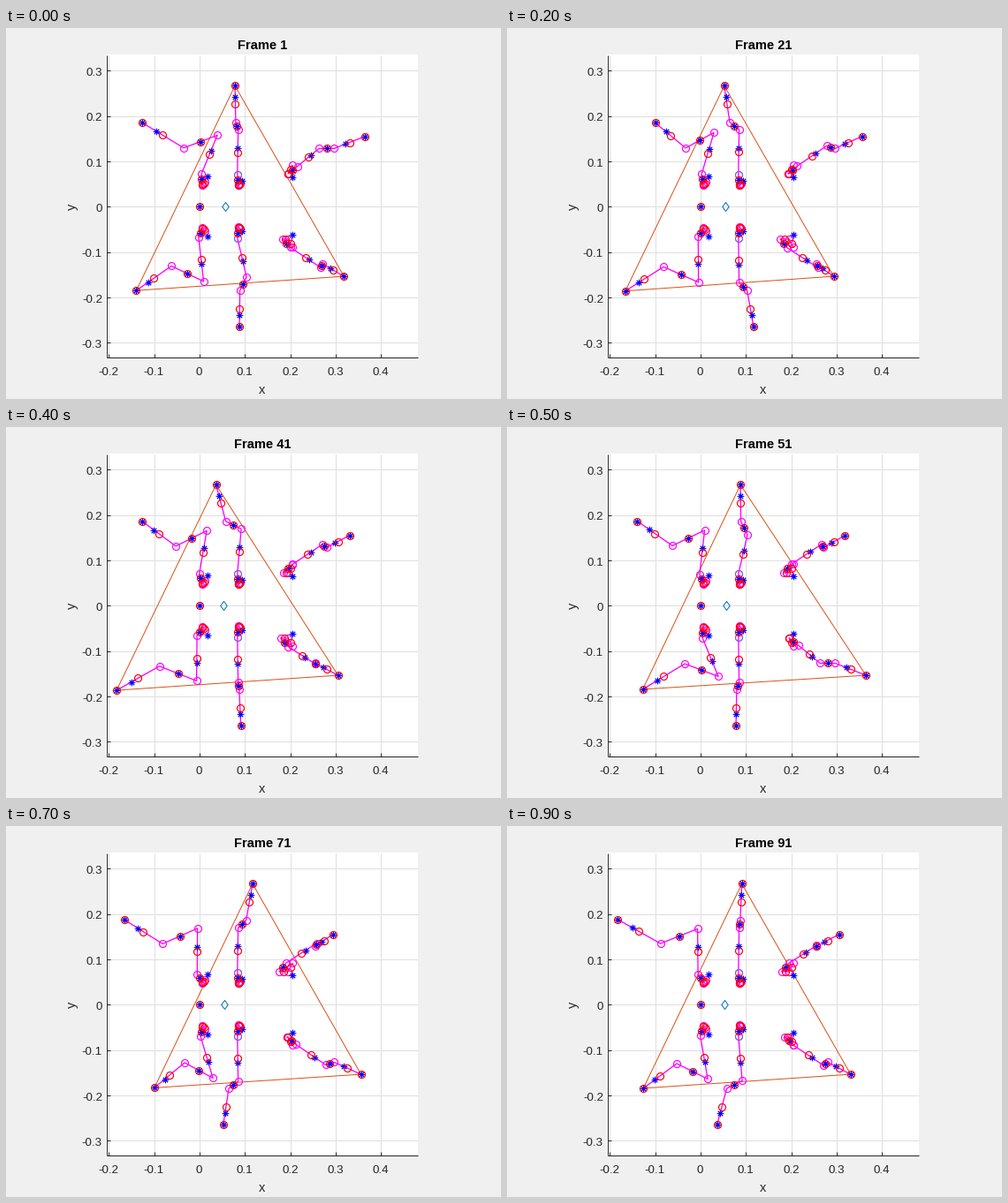
A matplotlib script for the animation above (1 s loop, 560x420 px).

```python
import numpy as np
import matplotlib.pyplot as plt
from matplotlib.animation import FuncAnimation
from matplotlib.patches import Rectangle

W, H, DPI = 560, 420, 100
PX = 72 / DPI                      # points per pixel
FRAMES, INTERVAL = 10, 100
X0, Y0, SCALE = 218.6, 201.9, 513.4
LEFT, RIGHT, TOP, BOTTOM = 113.5, 465.5, 30.5, 372.5
INK = "#262626"

plt.rcParams["font.family"] = "Liberation Sans"

# Key poses of the gait, in pixels from the body origin with y pointing outwards:
# phase, knee x, knee y, ankle x, foot x
REAR = [(0, 20.5, 80.5, -17.5, -65), (1, 19, 83, -11.5, -44),
        (8, -5.5, 86.5, -46.5, -91.5), (9, -3, 85.5, -45, -93.5)]
MIDDLE = [(3, 44, 87, 29.5, 20.5), (4, 47.5, 86.5, 30, 19),
          (5, 53.5, 80, 46, 45.5), (6, 44, 86.5, 57, 67)]
FRONT = [(0, 135.5, 65.5, 152.5, 187.5), (1, 148, 67.5, 164.5, 199),
         (2, 143, 68.5, 152.5, 183), (8, 131, 69.5, 127, 144.5),
         (9, 131.5, 66.5, 131, 157)]


def pose(keys, phase):
    """Linear motion between the key poses of one cycle."""
    times, *tracks = zip(*keys)
    return [np.interp(phase, times, track, period=FRAMES) for track in tracks]


# Each leg returns its joints from hip to foot.
def rear(phase):
    kx, ky, ax, fx = pose(REAR, phase)
    cx = -2.5 + 0.22 * (kx + 3)
    return [(6.5, 28), (3.5, 24), (3, 25.5), (cx, 34 + 0.6 * (cx + 2.5)), (kx, ky),
            (ax, 68.5 - 0.1 * (ax + 41.5)), (fx, 96.2 - 0.04 * (fx + 94.5))]


def middle(phase):
    kx, ky, ax, fx = pose(MIDDLE, phase)
    return [(46.5, 25.5), (44.5, 23.5), (44.5, 24.5), (43.2, 36), (kx, ky),
            (ax, 95.2), (fx, 136.5)]


def front(phase):
    kx, ky, ax, fx = pose(FRONT, phase)
    cx = 96.5 + 0.34 * (fx - 144.5)
    return [(105.5, 46.5), (100.5, 37), (89.5 + 0.8 * (cx - 97.5), 37),
            (cx, 47.5 - 0.15 * (cx - 96.5)), (kx, ky), (ax, 65.5), (fx, 79.2)]


# leg, hip mass, and where the masses sit along thigh and shin
LEGS = [(rear, (9, 34), 0.6, 0.655),
        (middle, (48.5, 28.5), 0.59, 0.685),
        (front, (105.5, 32.5), 0.62, 0.37)]


def to_stage(points, side):
    return np.array([X0, Y0]) + np.array(points) * (1, side)


def place_leg(spec, frame, side):
    """Joints, link centres and masses; the lower side runs half a cycle later."""
    leg, hip_mass, thigh, shin = spec
    joints = np.array(leg((frame + (5 if side > 0 else 0)) % FRAMES))
    centres = (joints[:-1] + joints[1:]) / 2
    coxa, knee, ankle, foot = joints[3:]
    masses = [hip_mass, centres[2], coxa + thigh * (knee - coxa),
              centres[4], ankle + shin * (foot - ankle), foot]
    return [to_stage(p, side) for p in (joints, centres, masses)]


fig = plt.figure(figsize=(W / DPI, H / DPI), dpi=DPI, facecolor="#f0f0f0")
ax = fig.add_axes([0, 0, 1, 1])
ax.set_xlim(0, W)
ax.set_ylim(H, 0)
ax.axis("off")


def label(x, y, text, size, **kw):
    kw = {"color": INK, "ha": "center", "va": "baseline", **kw}
    return ax.text(x, y, text, fontsize=size * PX, **kw)


def rule(x, y, color=INK):
    """One-pixel line on pixel centres."""
    ax.plot(np.floor(x) + 0.5, np.floor(y) + 0.5, color=color, lw=PX, zorder=1,
            solid_capstyle="butt")


def draw_axes():
    ax.add_patch(Rectangle((LEFT - 0.5, TOP - 0.5), RIGHT - LEFT + 1, BOTTOM - TOP + 1,
                           facecolor="white", lw=0, zorder=0))
    x_ticks = [(X0 + v * SCALE / 10, v) for v in range(-2, 5)]
    y_ticks = [(Y0 - v * SCALE / 10, v) for v in range(-3, 4)]
    for x, _ in x_ticks:
        rule([x, x], [TOP, BOTTOM], "#dfdfdf")
    for y, _ in y_ticks:
        rule([LEFT, RIGHT], [y, y], "#dfdfdf")
    for x, v in x_ticks:
        rule([x, x], [BOTTOM - 4, BOTTOM])
        label(x, 393, f"{v / 10:g}", 13.33)
    for y, v in y_ticks:
        rule([LEFT, LEFT + 4], [y, y])
        label(109, y + 6, f"{v / 10:g}", 13.33, ha="right")
    rule([LEFT, LEFT], [TOP, BOTTOM])
    rule([LEFT, RIGHT], [BOTTOM, BOTTOM])
    label(290, 413.5, "x", 14.67)
    label(75, 202.5, "y", 14.67, rotation=90, va="center")


def markers(marker, color, size=8, width=1.2, z=4, **kw):
    return ax.plot([], [], ls="none", marker=marker, ms=size * PX, mfc="none",
                   mec=color, mew=width * PX, zorder=z, **kw)[0]


draw_axes()
title = label(290, 24, "", 14.67, color="black", weight="bold")
support, = ax.plot([], [], color="#d95319", lw=PX, zorder=2)
links = [ax.plot([], [], color="magenta", lw=1.33 * PX, zorder=3)[0] for _ in range(6)]
joint_dots = markers("o", "magenta", z=4)
coxa_dots = markers("o", "#00b4e6", width=1, z=5, alpha=0.6)
mass_stars = markers((8, 2, 0), "blue", size=7.4, width=1, z=6)
centre_dots = markers("o", "red", z=7)
body = markers([(0, 1), (0.75, 0), (0, -1), (-0.75, 0), (0, 1)], "#0072bd",
               size=10, width=1, z=6)


def update(frame):
    origin = (X0, Y0)
    joints, centres, masses, feet, coxae = [], [origin], [origin], {}, []
    sides = [(spec, side) for spec in LEGS for side in (-1, 1)]
    for line, (spec, side) in zip(links, sides):
        points, mids, stars = place_leg(spec, frame, side)
        line.set_data(*points.T)
        joints.extend(points[:-1])
        centres.extend([*mids, points[-1]])
        masses.extend(stars)
        feet[spec[0], side] = points[-1]
        if spec[0] is middle:
            coxae.append(points[3])
    corners = [feet[key] for key in ((middle, -1), (rear, 1), (front, 1), (middle, -1))]
    centre_of_mass = [(X0 + 28.9 - 0.5 * (frame % 5), Y0)]
    for artist, points in ((support, corners), (joint_dots, joints), (coxa_dots, coxae),
                           (centre_dots, centres), (mass_stars, masses),
                           (body, centre_of_mass)):
        artist.set_data(*np.array(points).T)
    title.set_text(f"Frame {10 * frame + 1}")
    return [title, support, *links, joint_dots, coxa_dots, centre_dots, mass_stars, body]


anim = FuncAnimation(fig, update, frames=FRAMES, interval=INTERVAL, repeat=True,
                     repeat_delay=0, blit=False)
plt.show()
```
